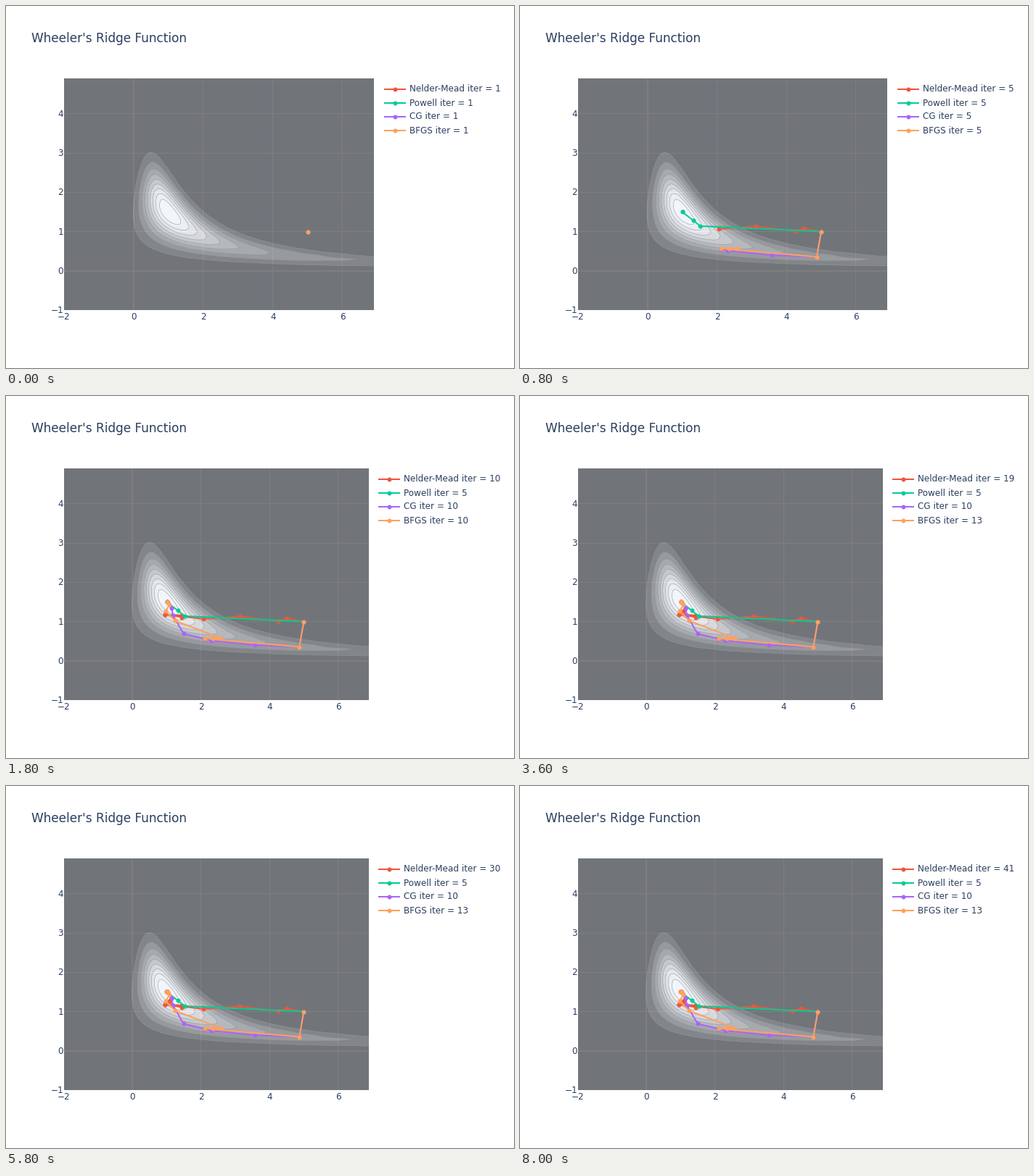
Animation, 700 px wide and 500 px high, one loop 8200 ms. Source, as a matplotlib script:

```python
import numpy as np
import matplotlib.pyplot as plt
from matplotlib.animation import FuncAnimation

W, H, DPI = 700, 500, 100
PX = 72 / DPI
LEFT, TOP, PLOT_H = 80, 100, 320
X0, X1, Y0, Y1 = -2, 6.9, -1, 4.9
STEPS = 41
INK = "#2a3f5f"
PAPER = np.array([229, 236, 246]) / 255
GREYS = [0, 37, 82, 115, 150, 189, 217, 240, 255]

plt.rcParams["font.family"] = "DejaVu Sans"
plt.rcParams["axes.unicode_minus"] = True


def ridge(x, y, a=1.5):
    return -np.exp(-(x * y - a) ** 2 - (y - a) ** 2)


def nelder_mead(start, count):
    """Best simplex vertex after each iteration."""
    def cost(p):
        return ridge(*p)

    start = np.array(start, float)
    sim = [start] + [start * (1 + 0.05 * e) for e in np.eye(2)]
    sim.sort(key=cost)
    path = [sim[0]]
    while len(path) < count:
        best, mid, worst = sim
        centre = (best + mid) / 2

        def along(t):
            return centre + t * (centre - worst)

        new = along(1)
        if cost(new) < cost(best):
            far = along(2)
            if cost(far) < cost(new):
                new = far
        elif cost(new) >= cost(mid):
            outside = cost(new) < cost(worst)
            near = along(0.5 if outside else -0.5)
            if outside:
                good = cost(near) <= cost(new)
            else:
                good = cost(near) < cost(worst)
            new = near if good else None
        if new is None:
            sim = [best] + [best + 0.5 * (p - best) for p in (mid, worst)]
        else:
            sim[2] = new
        sim.sort(key=cost)
        path.append(sim[0])
    return path


START = (5, 1)
RUNS = [
    ("Nelder-Mead", "#EF553B", nelder_mead(START, STEPS)),
    ("Powell", "#00cc96",
     [START, (1.52, 1.14), (1.32, 1.28), (1, 1.5), (1, 1.5)]),
    ("CG", "#ab63fa",
     [START, (4.87, .355), (3.58, .4), (2.31, .51), (2.12, .555),
      (1.49, .69), (1.18, 1.16), (1.14, 1.35), (1.02, 1.48), (1, 1.5)]),
    ("BFGS", "#FFA15A",
     [START, (4.87, .355), (2.11, .57), (2.35, .565), (2.58, .575),
      (1.245, 1.02), (.967, 1.265), (1.075, 1.425), (1, 1.49)]
     + [(1, 1.5)] * 4),
]


def plot_width(step):
    """The plot gives way as the legend text grows."""
    return 427 if step == 1 else 426 if step < 10 else 420


def to_px(x, width):
    return LEFT + (x - X0) / (X1 - X0) * width


def to_py(y):
    return TOP + (Y1 - y) / (Y1 - Y0) * PLOT_H


def paper(width):
    """Plot background with white grid, one cell per pixel."""
    img = np.tile(PAPER, (PLOT_H, width, 1))
    for x in (2, 4, 6):
        img[:, int(to_px(x, width)) - LEFT] = 1
    for y in (1, 2, 3, 4):
        img[int(to_py(y)) - TOP] = 1
    col = round(to_px(0, width)) - LEFT
    row = round(to_py(0)) - TOP
    img[:, col - 1:col + 1] = 1
    img[row - 1:row + 1] = 1
    return img


fig = plt.figure(figsize=(W / DPI, H / DPI), dpi=DPI, facecolor="white")

# Plot area in data units
plot = fig.add_axes([0, 0, 1, 1])
plot.set_axis_off()
gx, gy = np.meshgrid(np.arange(-20, 70) / 10, np.arange(-10, 50) / 10)
gz = -ridge(gx, gy)
levels = np.arange(1, 10) / 10
plot.fill([X0, X1, X1, X0], [Y0, Y0, Y1, Y1], color="black", lw=0, zorder=0)
for i, level in enumerate(levels, 1):
    grey = np.interp(i / 9, np.linspace(0, 1, 9), GREYS) / 255
    plot.contourf(gx, gy, gz, levels=[level, 2], colors=[(grey,) * 3],
                  antialiased=True, zorder=1)
plot.contour(gx, gy, gz, levels=levels, colors="#444444",
             linewidths=0.5 * PX, zorder=1.5)
# Half-transparent paper on top equals a half-transparent contour over it
veil = plot.imshow(paper(427), extent=(X0, X1, Y0, Y1), alpha=0.5,
                   aspect="auto", interpolation="nearest", zorder=2)
plot.set_xlim(X0, X1)
plot.set_ylim(Y0, Y1)

# Labels and legend in pixel units
page = fig.add_axes([0, 0, 1, 1])
page.set_axis_off()
page.patch.set_visible(False)
page.set_xlim(0, W)
page.set_ylim(H, 0)


def label(x, y, text, size=12, ha="left"):
    return page.text(x, y, text, size=size * PX, color=INK, ha=ha,
                     va="baseline")


def signed(v):
    return str(v).replace("-", "\u2212")


label(35, 50, "Wheeler's Ridge Function", 16.9)
for y in range(-1, 5):
    label(79, to_py(y) + 4.2, signed(y), ha="right")
x_labels = [(x, label(0, 433, signed(x), ha="center")) for x in (-2, 0, 2, 4, 6)]

style = dict(lw=2 * PX, marker="o", ms=6 * PX, mew=0, solid_joinstyle="round",
             solid_capstyle="butt")
rows = []
for i, (name, color, path) in enumerate(RUNS):
    y = 114.5 + 19 * i
    trace, = plot.plot([], [], color=color, zorder=3 + i, **style)
    key, = page.plot([0, 0, 0], [y] * 3, color=color, markevery=[1], **style)
    rows.append((name, np.array(path), trace, key, label(0, y + 4, "")))


def draw(frame):
    step = frame + 1
    width = plot_width(step)
    plot.set_position([LEFT / W, (H - TOP - PLOT_H) / H, width / W, PLOT_H / H])
    veil.set_data(paper(width))
    for x, text in x_labels:
        text.set_x(to_px(x, width))
    legend = LEFT + 1.02 * width
    for name, path, trace, key, text in rows:
        n = min(step, len(path))
        trace.set_data(path[:n, 0], path[:n, 1])
        key.set_xdata([legend + 5, legend + 20, legend + 35])
        text.set_x(legend + 40)
        text.set_text(f"{name} iter = {n}")
    return []


anim = FuncAnimation(fig, draw, frames=STEPS, interval=200, repeat=True,
                     repeat_delay=0, blit=False)
plt.show()
```
